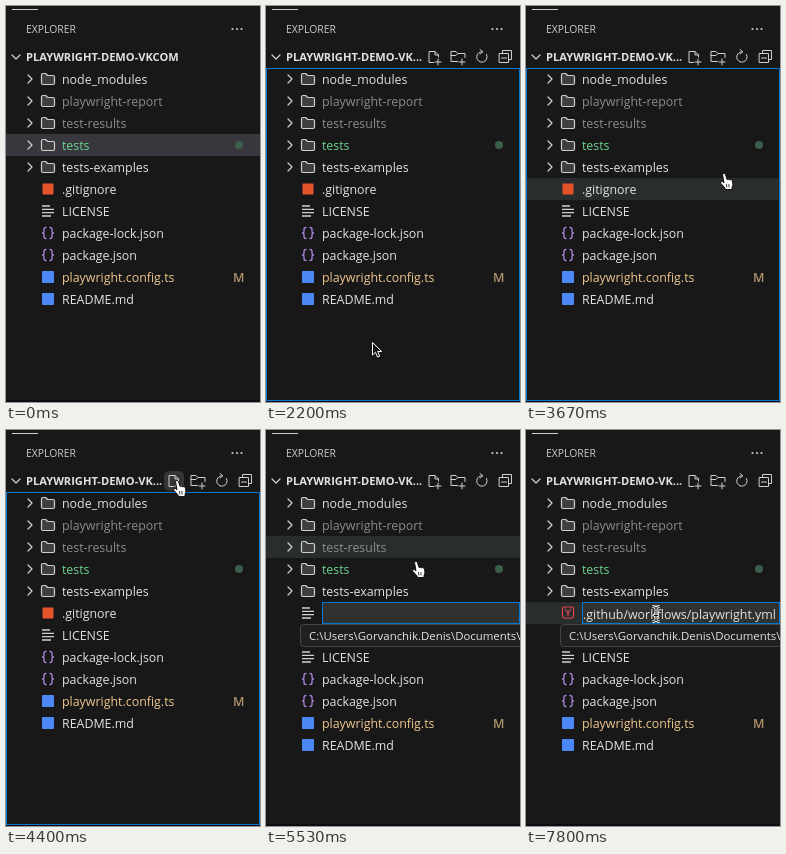
Recreate the animation shown at these times as an HTML page. Size 254 px wide and 396 px high, loop 8000 ms.

```html
<!DOCTYPE html>
<html lang="en">
<head>
<meta charset="utf-8">
<title>File explorer</title>
<style>
  html, body { margin: 0; width: 100%; height: 100%; overflow: hidden; background: #181818; }
  svg { display: block; width: 100%; height: 100%; }
  text { font: 12.4px "Open Sans", "Noto Sans", sans-serif; fill: #e2e2e2; font-variant-ligatures: none; white-space: pre; }
  .caption { font-size: 10.4px; fill: #ccc; }
  .title { font-size: 11.1px; font-weight: 700; }
  .hint { font-size: 11.4px; }
  .line { fill: none; stroke: #d0d0d0; stroke-width: 1; stroke-linejoin: round; stroke-linecap: round; }
</style>
</head>
<body>
<svg viewBox="0 0 254 396" xmlns="http://www.w3.org/2000/svg">
  <defs>
    <path id="chevron" class="line" style="stroke-width:1.2" d="M-2-4l4 4-4 4"/>
    <path id="folder" class="line" style="fill:#3f3f3f;stroke-width:1.2" d="M-6.500-4q0-1.500 1.500-1.500h2.600l2 2h5.400q1.500 0 1.500 1.500v6q0 1.500-1.500 1.500h-10q-1.500 0-1.500-1.500z"/>
    <path id="lines" class="line" style="stroke-width:1.3;stroke-linecap:butt" d="M-6-5h8M-6-1.700h12M-6 1.700h12M-6 5h9"/>
    <path id="braces" class="line" style="stroke:#a985dd;stroke-width:1.3" d="M-2-5.500q-2 0-2 2v1.500q0 2-1.500 2 1.500 0 1.500 2v1.500q0 2 2 2M2-5.500q2 0 2 2v1.500q0 2 1.500 2-1.500 0-1.500 2v1.500q0 2-2 2"/>
    <rect id="orange" x="-5.500" y="-5.500" width="11" height="11" fill="#e5532d"/>
    <rect id="blue" x="-6" y="-6" width="12" height="12" rx="1" fill="#4b87f5"/>
    <g id="yaml" class="line" style="stroke:#e5484d;stroke-width:1.2">
      <rect x="-5.500" y="-6" width="11" height="11" rx="1.500"/>
      <path d="M-2.500-3.500l2.500 3.300L2.500-3.500M0-.2V2.700"/>
    </g>
  </defs>

  <rect width="254" height="396" fill="#181818"/>
  <path d="M6 3.500h26" stroke="#d0d0d0"/>
  <text class="caption" x="20" y="27">EXPLORER</text>
  <g fill="#ccc"><circle cx="226.500" cy="23" r="1.100"/><circle cx="231" cy="23" r="1.100"/><circle cx="235.500" cy="23" r="1.100"/></g>

  <use href="#chevron" transform="translate(10 51) rotate(90)"/>
  <text id="title" class="title" x="20" y="55"></text>
  <g id="actions">
    <rect id="button" x="158" y="41" width="20" height="20" rx="5" fill="#343535"/>
    <path class="line" transform="translate(168.500 51)" d="M-1 5.500h-4.500v-11h6l3.500 3.500v2M.5-5.500v3.500h3.500M3.500 2v6M.5 5h6"/>
    <path class="line" transform="translate(192 51)" d="M-.5 4.500h-6.500v-10h5l2 2h7v4M-7-1.500h5l2-2M4 2v6M1 5h6"/>
    <path class="line" transform="translate(216 51)" d="M4.500-2.500a5.200 5.200 0 1 1-4-2.700M-2-7.500l2.700 2.300-2.700 2.300"/>
    <path class="line" transform="translate(239.500 50.500)" d="M-3-3v-3h9v9h-3M-6-3h9v9h-9zM-4 1.500h5"/>
  </g>

  <rect id="selected" y="128" width="254" height="22" fill="#37373d"/>
  <rect id="hover" width="254" height="22" fill="#2a2d2e"/>
  <g id="upper"></g>
  <g id="lower"></g>
  <path d="M0 395h254" stroke="#100a10" stroke-width="2"/>
  <rect id="focus" x=".5" y="62.500" width="253" height="332" fill="none" stroke="#0078d4"/>

  <g id="editor">
    <use id="fileIcon" transform="translate(42 183)"/>
    <rect x="56.500" y="172.500" width="197" height="21" fill="#313131" stroke="#0078d4"/>
    <text id="typed" x="57" y="188.500"></text>
    <rect id="caret" y="175" width="1" height="17" fill="#ccc"/>
  </g>
  <g id="hint">
    <rect x="34.500" y="194.500" width="230" height="22" rx="3" fill="#202020" stroke="#454545"/>
    <text class="hint" x="43" y="209.500"></text>
  </g>

  <g id="pointer">
    <path id="arrow" d="M.5.5v12.500l3-2.700 2 4.700 2.200-.9-2-4.600h4z" fill="#111" stroke="#fff"/>
    <g id="hand" stroke="#111" stroke-linejoin="round">
      <path d="M-2.500 1.500q1.500-2.500 3 0l1.500 5 1-.5 1.500.8 1.500-.3 1.500 1.500.5 4-1 2.500v2h-6.500l-.5-1.500-4.500-5q-.5-2 1.500-1.700l2 1.500z" fill="#fff"/>
      <path d="M1.500 11l.3 3.500M3.800 11l.3 3.500" stroke-width=".8"/>
    </g>
    <g id="beam" fill="none">
      <path d="M-3.500-7.500q3 0 3.500 2 .5-2 3.500-2M0-6v12M-3.500 7.500q3 0 3.500-2 .5 2 3.500 2M-2 1.500h4" stroke="#fff" stroke-width="3"/>
      <path d="M-3.500-7.500q3 0 3.500 2 .5-2 3.500-2M0-6v12M-3.500 7.500q3 0 3.500-2 .5 2 3.500 2M-2 1.500h4" stroke="#111"/>
    </g>
  </g>
</svg>

<script>
const LOOP = 8000, FPS = 15, ROW = 22, LIST_TOP = 62;
const $ = id => document.getElementById(id);
const show = (id, on) => $(id).setAttribute('visibility', on ? 'inherit' : 'hidden');
const GREEN = '#6fd48f', SAND = '#efc78f', DIM = '#8c8c8c';

const files = [
  ['node_modules', 'folder'],
  ['playwright-report', 'folder', DIM],
  ['test-results', 'folder', DIM],
  ['tests', 'folder', GREEN],
  ['tests-examples', 'folder'],
  ['.gitignore', 'orange'],
  ['LICENSE', 'lines'],
  ['package-lock.json', 'braces'],
  ['package.json', 'braces'],
  ['playwright.config.ts', 'blue', SAND],
  ['README.md', 'blue'],
];

files.forEach(([name, icon, color = '#e2e2e2'], i) => {
  const y = LIST_TOP + ROW * (i + .5);
  const use = (id, x) => `<use href="#${id}" transform="translate(${x} ${y})"/>`;
  let row = use(icon, 42) + `<text x="56" y="${y + 4.5}" style="fill:${color}">${name}</text>`;
  if (icon === 'folder') row += use('chevron', 24);
  if (color === GREEN) row += `<circle cx="233" cy="${y}" r="4" fill="#3a5f4a"/>`;
  if (color === SAND) row += `<text x="227" y="${y + 4.5}" style="fill:#b0946c;font-weight:600">M</text>`;
  $(i < 5 ? 'upper' : 'lower').insertAdjacentHTML('beforeend', row);
});
document.querySelector('text.hint').textContent = String.raw`C:\Users\Gorvanchik.Denis\Documents` + '\\';

// Pointer path: step, x, y
const path = [
  [16, 246, 215], [19, 190, 262], [22, 140, 305], [25, 112, 332], [27, 106, 336],
  [46, 106, 336], [48, 113, 320], [51, 150, 255], [54, 195, 179], [55, 199, 167],
  [59, 182, 76], [61, 174, 58], [63, 172, 49], [65, 172, 49], [66, 172, 50],
  [75, 172, 50], [78, 168, 72], [82, 154, 122], [83, 151, 131], [86, 141, 172],
  [88, 134, 189], [92, 131, 193.5], [95, 131, 193.5], [96, 130, 188], [97, 130, 185],
  [115, 130, 185], [116, 131, 186], [117, 130, 184],
];

function pointerAt(step) {
  const next = path.findIndex(key => key[0] >= step);
  if (next < 0) return path[path.length - 1].slice(1);
  if (next === 0) return path[0].slice(1);
  const [s0, x0, y0] = path[next - 1], [s1, x1, y1] = path[next];
  const k = (step - s0) / (s1 - s0);
  return [x0 + (x1 - x0) * k, y0 + (y1 - y0) * k];
}

function render(step) {
  const inside = step >= 16, editing = step >= 68, pasted = step >= 108;
  const [x, y] = pointerAt(step);
  const [hoverX, hoverY] = pointerAt(step - 1); // hover trails the pointer by one step
  const row = Math.floor((hoverY - LIST_TOP) / ROW);

  $('title').textContent = inside ? 'PLAYWRIGHT-DEMO-VK...' : 'PLAYWRIGHT-DEMO-VKCOM';
  show('actions', inside);
  show('button', inside && hoverY > 41 && hoverY < 61 && Math.abs(hoverX - 168) < 10);

  const selected = step < 33;
  show('selected', selected);
  show('hover', inside && row >= 0 && row < files.length + editing && !(selected && row === 3));
  $('hover').setAttribute('y', LIST_TOP + row * ROW);
  show('focus', step >= 31 && !editing);

  $('lower').setAttribute('transform', `translate(0 ${editing ? ROW : 0})`);
  show('editor', editing);
  show('hint', step >= 76);
  $('fileIcon').setAttribute('href', pasted ? '#yaml' : '#lines');
  $('typed').textContent = pasted ? '.github/workflows/playwright.yml' : '';
  const blink = Math.floor((step - (pasted ? 108 : 68)) / 8);
  show('caret', editing && blink % 2 === 0);
  $('caret').setAttribute('x', pasted ? Math.round(57 + $('typed').getComputedTextLength()) : 57);

  show('pointer', inside);
  $('pointer').setAttribute('transform', `translate(${Math.round(x)} ${Math.round(y)})`);
  const kind = step >= 97 ? 'beam' : y > 304 ? 'arrow' : 'hand';
  for (const id of ['arrow', 'hand', 'beam']) show(id, inside && id === kind);
}

function tick() {
  const time = performance.now() % LOOP;
  render(Math.min(LOOP * FPS / 1000 - 1, Math.floor((time + 4) * FPS / 1000)));
  requestAnimationFrame(tick);
}
tick();
</script>
</body>
</html>
```
